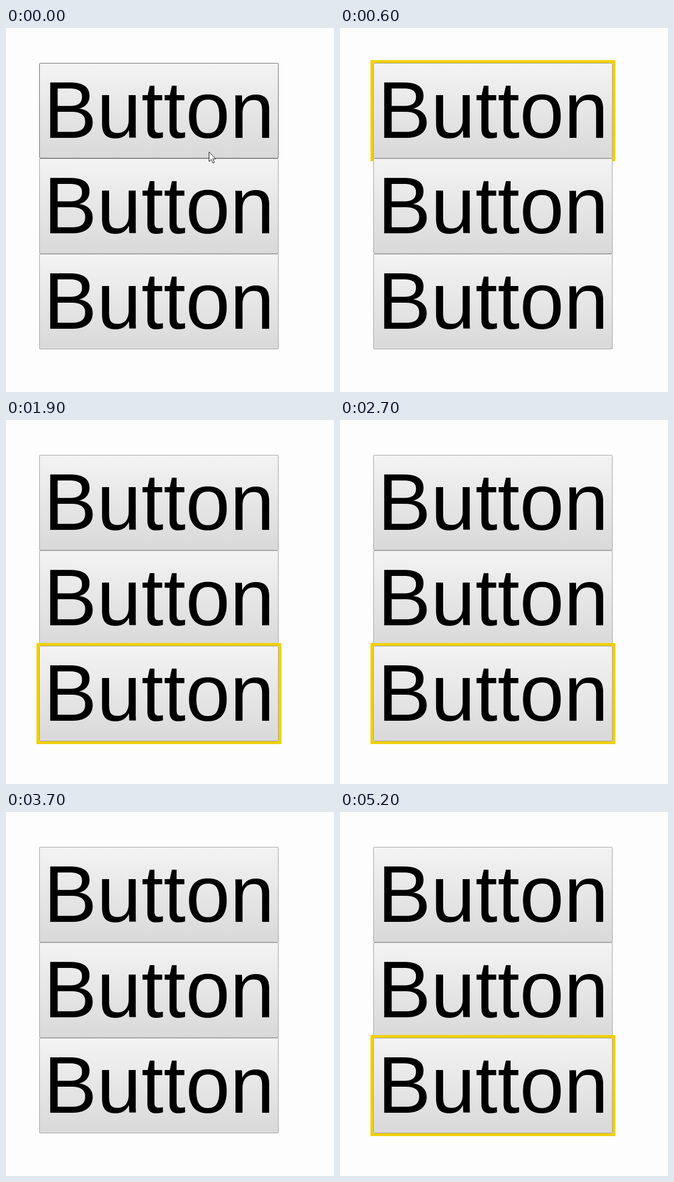
An HTML page that plays this animation: 592 by 656 pixels, repeating every 5.3 s.

```html
<!DOCTYPE html>
<html lang="en">
<head>
<meta charset="utf-8">
<title>Focus ring</title>
<style>
  html, body { margin: 0; width: 100%; height: 100%; overflow: hidden; background: #fdfdfd; }
  svg { display: block; width: 592px; height: 656px; }
  text { font: 144px "Liberation Sans", Arial, sans-serif; fill: #000; }
  .face { fill: url(#face); stroke: #a2a2a2; }
  .hover .face { stroke: #6c6c6c; }
  .ring { fill: none; stroke: #f0d000; stroke-width: 5; visibility: hidden; }
  .focus .ring { visibility: visible; }
</style>
</head>
<body>
<svg viewBox="0 0 592 656">
  <defs>
    <linearGradient id="face" x2="0" y2="1">
      <stop offset="0" stop-color="#f3f3f3"/>
      <stop offset="1" stop-color="#d9d9d9"/>
    </linearGradient>
  </defs>
  <g id="buttons"></g>
  <path id="cursor" d="M366.5 223.5v17l4-3.6 2.8 6.4 2.7-1.2-2.8-6.2h5.2z" fill="#fdfdfd" stroke="#111"/>
</svg>
<script>
const LOOP = 5300, HOVER_END = 100;
const BOX = { x: 60, y: 63, w: 432, h: 172 };
const NONE = -1, FIRST = 0, LAST = 2;

// When the ring jumps, and to which button
const FOCUS = [
  [0, NONE], [300, FIRST],
  [800, NONE], [900, LAST], [1000, NONE],
  [1500, FIRST], [1700, NONE], [1900, LAST], [2100, NONE],
  [2700, LAST], [2900, NONE], [3100, FIRST], [3300, NONE],
  [3600, FIRST], [3700, NONE], [3900, LAST], [4100, NONE],
  [4500, FIRST], [4700, NONE], [4900, LAST]
];

const root = document.getElementById('buttons');
const cursor = document.getElementById('cursor');

// Later buttons paint over the ring of earlier ones
root.innerHTML = [0, 1, 2].map(i => `
  <g transform="translate(${BOX.x} ${BOX.y + i * BOX.h})">
    <rect class="face" x=".5" y=".5" width="${BOX.w - 1}" height="${BOX.h - 1}" rx="1.5"/>
    <text x="8" y="135">Button</text>
    <rect class="ring" x="-2.5" y="-2.5" width="${BOX.w + 5}" height="${BOX.h + 5}"/>
  </g>`).join('');

const buttons = [...root.children];

function render(time) {
  const t = time % LOOP;
  const [, focused] = FOCUS.findLast(([at]) => at <= t);
  buttons.forEach((button, i) => button.classList.toggle('focus', i === focused));

  const pointing = t < HOVER_END;
  buttons[0].classList.toggle('hover', pointing);
  cursor.style.display = pointing ? '' : 'none';
}

const start = performance.now();
function tick() {
  render(performance.now() - start);
  requestAnimationFrame(tick);
}
tick();
</script>
</body>
</html>
```
